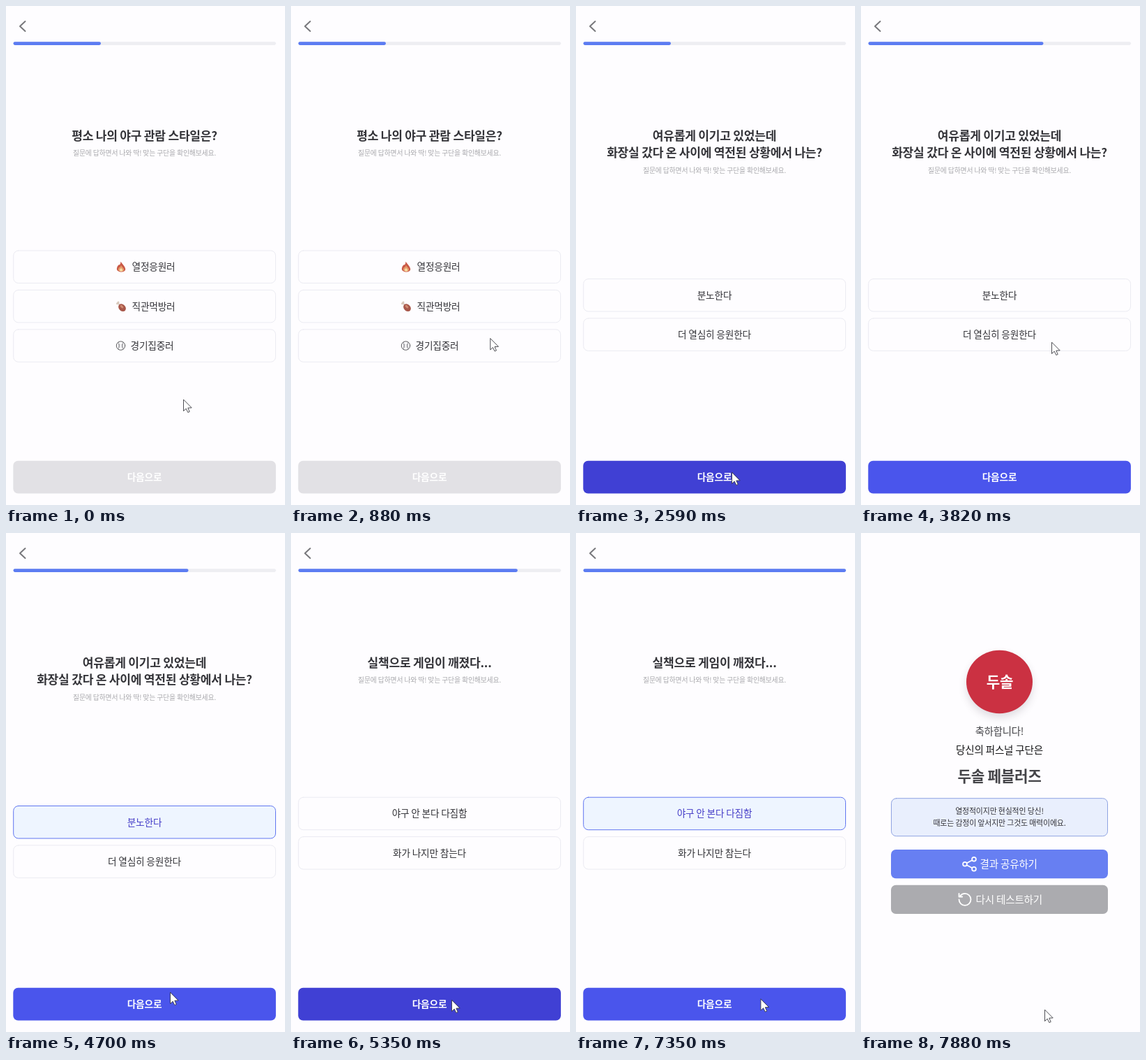
Recreate the animation shown at these times as an HTML page with a canvas. Size 400 px wide and 714 px high, loop 8 s.

```html
<!DOCTYPE html>
<html lang="ko">
<head>
<meta charset="utf-8">
<title>야구 구단 테스트</title>
<style>
html, body { margin: 0; width: 100%; height: 100%; overflow: hidden; background: #fefdff; }
canvas { display: block; width: 400px; height: 714px; }
</style>
</head>
<body>
<canvas id="stage"></canvas>
<script>
const W = 400, H = 714, LOOP = 8000, CENTER = 198.5;
const FONT = '"Noto Sans CJK KR", "Noto Sans CJK", "Noto Sans CJK JP", sans-serif';
const canvas = document.getElementById('stage');
const ctx = canvas.getContext('2d');
const ratio = window.devicePixelRatio || 1;
canvas.width = W * ratio;
canvas.height = H * ratio;

const BG = '#fefdff', INK = '#333338';
const GREY = [226, 225, 229], BLUE = [74, 85, 236], DEEP = [64, 64, 212];

const questions = [
  { from: 0, picked: 2060, top: 350, lines: ['평소 나의 야구 관람 스타일은?'],
    options: ['열정응원러', '직관먹방러', '경기집중러'], icons: [flame, drumstick, baseball] },
  { from: 2550, picked: 4180, top: 390.5,
    lines: ['여유롭게 이기고 있었는데', '화장실 갔다 온 사이에 역전된 상황에서 나는?'],
    options: ['분노한다', '더 열심히 응원한다'] },
  { from: 4980, picked: 6650, top: 378.2, lines: ['실책으로 게임이 깨졌다...'],
    options: ['야구 안 본다 다짐함', '화가 나지만 참는다'] }
];
const RESULT_AT = 7750;

// Pointer stops: time, x, y
const path = [
  [0, 254, 563], [60, 254, 563], [180, 259, 562], [410, 259, 562], [800, 287, 482],
  [1180, 272, 426], [1410, 272, 426], [1700, 278, 377], [2110, 278, 377], [2480, 223, 667],
  [2940, 223, 667], [3410, 271, 500], [3700, 271, 500], [3820, 273, 481], [4080, 275, 417],
  [4260, 275, 417], [4700, 235, 657], [4820, 230, 668], [5350, 230, 668], [5700, 272, 555],
  [6000, 272, 555], [6410, 289, 476], [6600, 288, 408], [7000, 288, 408], [7410, 263, 682],
  [8000, 263, 682]
];
const hovers = [[2430, 3000], [4690, 5400], [7340, 8000]];

const clamp = v => Math.max(0, Math.min(1, v));
const ease = v => v * v * (3 - 2 * v);
const ramp = (t, start, length) => ease(clamp((t - start) / length));
const lerp = (a, b, k) => a + (b - a) * k;
const blend = (a, b, k) => a.map((v, i) => lerp(v, b[i], k));
const rgb = c => `rgb(${c.map(Math.round).join(',')})`;

function text(str, x, y, size, color, weight = 400, align = 'center') {
  ctx.font = `${weight} ${size}px ${FONT}`;
  ctx.letterSpacing = `${-0.015 * size}px`;
  ctx.textAlign = align;
  ctx.fillStyle = color;
  ctx.fillText(str, x, y + size * 0.36);
}

function box(x, y, w, h, r, fill, stroke) {
  ctx.beginPath();
  ctx.roundRect(x, y, w, h, r);
  ctx.fillStyle = fill;
  ctx.fill();
  if (stroke) line(stroke, 1);
}

function line(color, width) {
  ctx.strokeStyle = color;
  ctx.lineWidth = width;
  ctx.lineCap = ctx.lineJoin = 'round';
  ctx.stroke();
}

function ellipse(x, y, rx, ry, fill, angle = 0) {
  ctx.beginPath();
  ctx.ellipse(x, y, rx, ry, angle, 0, Math.PI * 2);
  ctx.fillStyle = fill;
  ctx.fill();
}

function drop(x, y, w, h, fill) {
  ctx.beginPath();
  ctx.moveTo(x - w * 0.1, y - h);
  ctx.bezierCurveTo(x + w * 0.3, y - h * 0.75, x + w, y - h * 0.5, x + w, y - h * 0.25);
  ctx.bezierCurveTo(x + w, y + h * 0.1, x - w, y + h * 0.1, x - w, y - h * 0.3);
  ctx.quadraticCurveTo(x - w, y - h * 0.5, x - w * 0.6, y - h * 0.68);
  ctx.quadraticCurveTo(x - w * 0.1, y - h * 0.65, x - w * 0.1, y - h);
  ctx.fillStyle = fill;
  ctx.fill();
}

function flame(y) {
  drop(165, y + 7, 6.2, 14.5, '#c95846');
  drop(165, y + 6.5, 4.2, 9, '#e59a68');
  drop(165, y + 6.3, 2.3, 5, '#f6dda5');
}

function drumstick(y) {
  ctx.beginPath();
  ctx.moveTo(160, y - 5);
  ctx.lineTo(164, y - 1);
  line('#d8c9bd', 2);
  ellipse(159.5, y - 4, 1.5, 1.5, '#d8c9bd');
  ellipse(161, y - 5.6, 1.5, 1.5, '#d8c9bd');
  ellipse(166.5, y + 2, 6, 4.7, '#a8574a', Math.PI / 4);
  ellipse(166, y + 0.5, 2.8, 1.6, '#cf8a70', Math.PI / 4);
}

function baseball(y) {
  ctx.beginPath();
  ctx.arc(164.5, y, 6.2, 0, Math.PI * 2);
  line('#444448', 0.9);
  for (const side of [-1, 1]) {
    ctx.beginPath();
    ctx.moveTo(164.5 + side * 3.4, y - 5);
    ctx.quadraticCurveTo(164.5 + side * 0.7, y, 164.5 + side * 3.4, y + 5);
    for (const dy of [-2, 0, 2]) {
      ctx.moveTo(164.5 + side * 1.2, y + dy);
      ctx.lineTo(164.5 + side * 3.2, y + dy);
    }
    line('#66666a', 0.6);
  }
}

function drawHeader(t) {
  ctx.beginPath();
  ctx.moveTo(27.5, 22);
  ctx.lineTo(20, 29);
  ctx.lineTo(27.5, 36);
  line('#78787c', 2);
  const share = (1 + ramp(t, 2920, 300) + ramp(t, 5200, 300)) / 3;
  box(10.5, 51.3, 376.5, 4.6, 2.3, '#eeeef2');
  box(10.5, 51.3, 376.5 * share, 4.6, 2.3, '#5c7cf2');
}

function drawQuestion(q, t) {
  q.lines.forEach((str, i) => text(str, CENTER, 185.5 + i * 24.7, 17.1, INK, 700));
  text('질문에 답하면서 나와 딱! 맞는 구단을 확인해보세요.', CENTER,
    210.5 + (q.lines.length - 1) * 24.5, 9.85, '#a8a8ac');
  q.options.forEach((label, i) => {
    const y = q.top + i * 56.4, mid = y + 23.3;
    const k = i === 0 ? ramp(t, q.picked, 150) : 0;
    box(10.7, y, 375.8, 46.5, 7, rgb(blend([254, 253, 255], [238, 245, 255], k)),
      rgb(blend([235, 235, 242], [96, 118, 240], k)));
    const color = rgb(blend([51, 51, 56], [70, 62, 200], k));
    if (q.icons) {
      q.icons[i](mid);
      text(label, i === 2 ? 209.5 : 211.5, mid, 13.7, color, 500);
    } else {
      text(label, CENTER, mid, 13.7, color, 500);
    }
  });
}

function drawNext(t) {
  let color = blend(GREY, BLUE, ramp(t, questions[0].picked, 150));
  for (const [enter, leave] of hovers) {
    color = blend(color, DEEP, ramp(t, enter, 150) * (1 - ramp(t, leave, 150)));
  }
  box(10.3, 650.7, 376.6, 46.8, 7, rgb(color));
  text('다음으로', CENTER, 674, 13.7, '#fff', 700);
}

function shareIcon(x, y) {
  const dots = [[6.5, -7], [-6.5, 0], [6.5, 7]];
  ctx.beginPath();
  ctx.moveTo(x + 3.8, y - 5.5);
  ctx.lineTo(x - 3.8, y - 1.5);
  ctx.moveTo(x - 3.8, y + 1.5);
  ctx.lineTo(x + 3.8, y + 5.5);
  for (const [dx, dy] of dots) {
    ctx.moveTo(x + dx + 2.9, y + dy);
    ctx.arc(x + dx, y + dy, 2.9, 0, Math.PI * 2);
  }
  line('#fff', 1.8);
}

function retryIcon(x, y) {
  ctx.beginPath();
  ctx.arc(x, y, 8.5, Math.PI, -Math.PI * 0.78, true);
  ctx.moveTo(x - 8.5, y - 8.5);
  ctx.lineTo(x - 8.5, y - 3.8);
  ctx.lineTo(x - 3.8, y - 3.8);
  line('#fff', 1.8);
}

function drawResult() {
  ctx.save();
  ctx.shadowColor = 'rgba(60,50,70,.16)';
  ctx.shadowBlur = 12 * ratio;
  ctx.shadowOffsetY = 6 * ratio;
  ellipse(CENTER, 213, 47.5, 45.3, '#cb3142');
  ctx.restore();
  text('두솔', CENTER + 0.5, 213, 21.2, '#fff', 700);
  text('축하합니다!', CENTER, 283.5, 14.4, '#444448');
  text('당신의 퍼스널 구단은', CENTER, 310.5, 14.6, '#161618', 500);
  text('두솔 페블러즈', CENTER, 348.5, 21.3, '#444448', 700);
  box(43.5, 379.7, 310, 54, 7, '#e9effd', '#8fa3e2');
  text('열정적이지만 현실적인 당신!', CENTER, 398.3, 10.95, INK);
  text('때로는 감정이 앞서지만 그것도 매력이에요.', CENTER, 415.3, 10.95, INK);
  box(43, 453, 311, 41.3, 7, '#677ff2');
  shareIcon(155.5, 473.7);
  text('결과 공유하기', 170.5, 473.7, 14.6, '#fff', 500, 'left');
  box(43, 503.8, 311, 41.3, 7, '#ababaf');
  retryIcon(149, 524.3);
  text('다시 테스트하기', 164.5, 524.3, 14.6, '#fff', 500, 'left');
}

function drawPointer(t) {
  const i = path.findIndex(stop => stop[0] > t);
  const [t0, x0, y0] = path[i - 1], [t1, x1, y1] = path[i];
  const k = ramp(t, t0, t1 - t0);
  ctx.save();
  ctx.translate(lerp(x0, x1, k) + 0.5, lerp(y0, y1, k) + 0.5);
  ctx.beginPath();
  ctx.moveTo(0, 0);
  for (const [x, y] of [[0, 16], [3.7, 12.6], [6.3, 18], [8.7, 17], [6.3, 11.6], [11.3, 11.4]]) {
    ctx.lineTo(x, y);
  }
  ctx.closePath();
  ctx.fillStyle = '#fff';
  ctx.fill();
  line('#3c3c42', 0.9);
  ctx.restore();
}

function draw(t) {
  ctx.setTransform(ratio, 0, 0, ratio, 0, 0);
  ctx.fillStyle = BG;
  ctx.fillRect(0, 0, W, H);
  if (t >= RESULT_AT) {
    drawResult();
  } else {
    drawHeader(t);
    drawQuestion(questions.filter(q => t >= q.from).pop(), t);
    drawNext(t);
  }
  drawPointer(t);
}

const start = performance.now();
function tick() {
  draw((performance.now() - start) % LOOP);
  requestAnimationFrame(tick);
}
tick();
</script>
</body>
</html>
```
